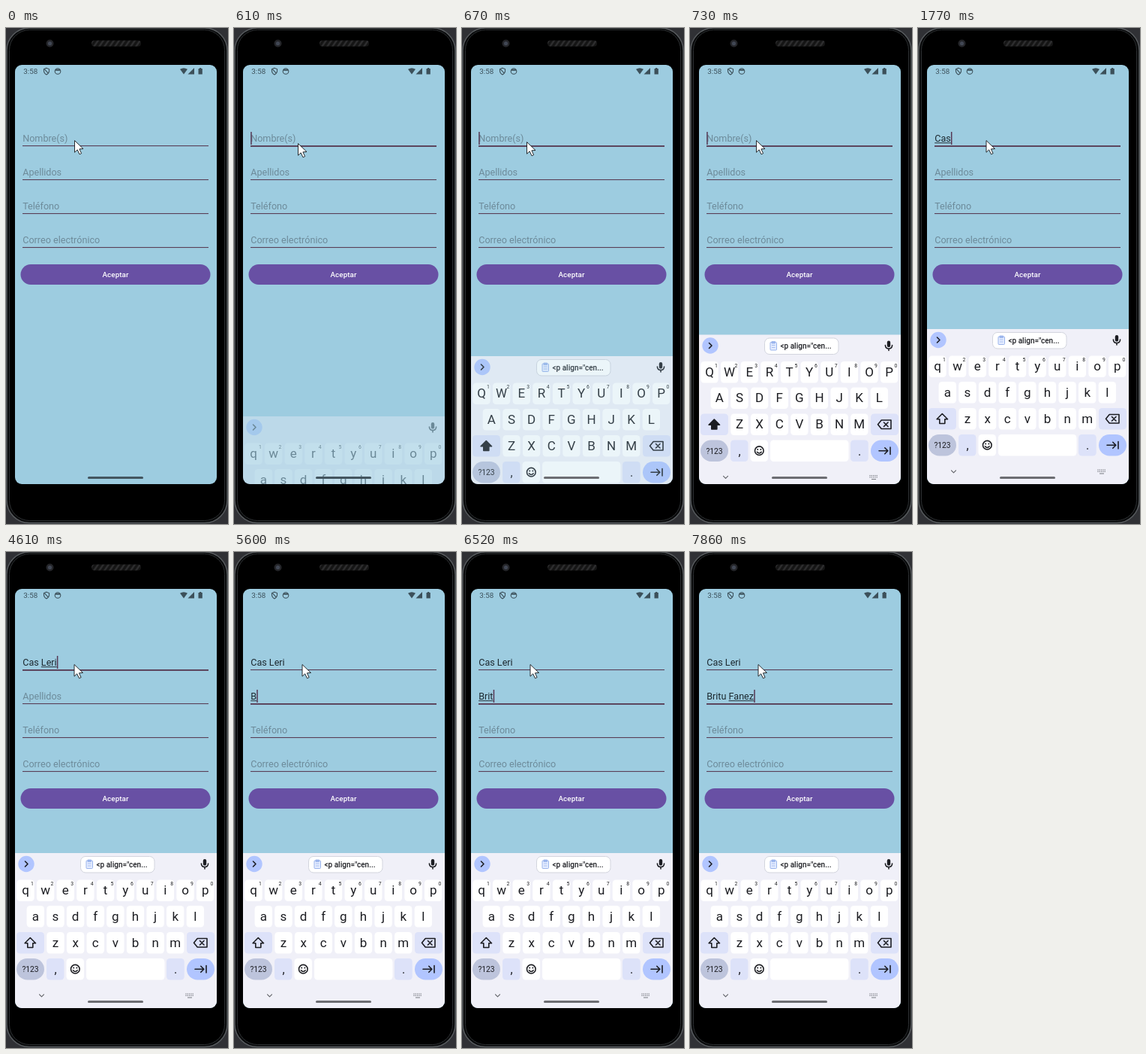
These frames come from a looping animation (296x659 px, 8000 ms). An HTML page:

```html
<!DOCTYPE html>
<html lang="es">
<head>
<meta charset="utf-8">
<style>
html, body { margin: 0; width: 100%; height: 100%; overflow: hidden; background: #303135; }
svg { display: block; width: 296px; height: 659px; font-family: Roboto, Arial, sans-serif; }
.entry { font-size: 12.6px; white-space: pre; }
.mid { text-anchor: middle; }
.ink { fill: none; stroke: #1c1d22; stroke-width: 1.6; stroke-linecap: round; stroke-linejoin: round; }
</style>
</head>
<body>
<svg viewBox="0 0 296 659">
  <defs>
    <clipPath id="screen"><rect x="12" y="49" width="269" height="557" rx="9"/></clipPath>
    <pattern id="mesh" width="7" height="8" patternUnits="userSpaceOnUse" patternTransform="skewX(-35)">
      <rect width="7" height="8" fill="#151515"/><rect width="3" height="8" fill="#2d2d2e"/>
    </pattern>
  </defs>
  <rect width="296" height="659" fill="#303135"/>
  <rect x="1" y="0" width="294" height="657.5" rx="30" fill="#0a0b0c" stroke="#5a5e61" stroke-width="1.4"/>
  <rect x="4.5" y="2.5" width="287" height="652" rx="27" fill="#000" stroke="#2b2e30"/>
  <circle cx="58.5" cy="20.5" r="5" fill="#25262a"/>
  <circle cx="58.5" cy="20.5" r="2.6" fill="#414754"/>
  <rect x="114" y="16.5" width="66" height="8" rx="4" fill="url(#mesh)"/>

  <g clip-path="url(#screen)">
    <rect x="12" y="49" width="269" height="557" fill="#9dcce0"/>
    <g fill="#3c505a">
      <text x="23.3" y="61" font-size="9.8">3:58</text>
      <path d="M232 54.8Q237 51.5 242 54.8L237 61.5Z"/>
      <path d="M251 53V61.5H242.5Z"/>
      <path d="M256.5 54H258V53H260.3V54H261.8V61.5H256.5Z"/>
      <g fill="none" stroke="#3c505a" stroke-width="1.1">
        <path d="M54 53.2L57.5 54.6V57.5Q57.2 60.4 54 62Q50.8 60.4 50.5 57.5V54.6ZM51.5 54.8L56.5 60.3"/>
        <circle cx="69" cy="57.5" r="3.8"/><path d="M66 55.8H72" stroke-width="2"/>
      </g>
    </g>
    <g id="form"></g>
    <rect x="19.5" y="314" width="253" height="27" rx="13.5" fill="#6850a4"/>
    <text class="mid" x="146" y="331.3" font-size="9.8" font-weight="500" letter-spacing=".1" fill="#fff">Aceptar</text>
    <rect id="caret" width="1.5" height="17" fill="#553753"/>
    <rect id="compose" height="1" fill="#24313a"/>
    <g id="keyboard"></g>
    <rect id="pill" x="109" y="596" width="74" height="3" rx="1.5"/>
  </g>
  <path id="pointer" d="M.5.5V16.2L4.2 12.8L7 18.8L9.6 17.6L6.9 11.8L12 11.5Z" fill="#fff" stroke="#15181b" stroke-width=".9" stroke-linejoin="round"/>
</svg>
<script>
const LOOP = 8000, LEFT = 22.2, STEP = 26.63;
const $ = id => document.getElementById(id);
const rowY = i => 151 + 45 * i;
const pen = document.createElement('canvas').getContext('2d');
const width = s => { pen.font = '12.6px Roboto, Arial, sans-serif'; return pen.measureText(s).width; };

// Latest entry whose time has come
const at = (list, t) => list.reduce((hit, e) => e[0] <= t ? e : hit, list[0]);

// time, field, text, start and end of the composing underline
const typing = [
  [0, -1, '', 0],
  [490, 0, '', 0],
  [850, 0, 'C', 0], [910, 0, 'Ca', 0, 1], [1090, 0, 'Ca', 0],
  [1770, 0, 'Cas', 0], [1890, 0, 'Cas ', 0, 3],
  [2070, 0, 'Cas L', 4], [2190, 0, 'Cas Le', 4], [2350, 0, 'Cas Ler', 4],
  [2470, 0, 'Cas Leri', 4], [2710, 0, 'Cas Leri ', 4, 8],
  [2890, 0, 'Cas Leri ', 9], [3010, 0, 'Cas Leri B', 9],
  [3290, 0, 'Cas Leri Br', 9], [3410, 0, 'Cas Leri Bri', 9],
  [3470, 0, 'Cas Leri Brit', 9], [3650, 0, 'Cas Leri Britu', 9],
  [3860, 0, 'Cas Leri Brit', 9], [4070, 0, 'Cas Leri Bri', 9],
  [4180, 0, 'Cas Leri Br', 9], [4290, 0, 'Cas Leri B', 9],
  [4400, 0, 'Cas Leri ', 9], [4510, 0, 'Cas Leri', 8], [4610, 0, 'Cas Leri', 4],
  [4980, 1, '', 0],
  [5600, 1, 'B', 0], [5890, 1, 'Br', 0], [6240, 1, 'Bri', 0], [6520, 1, 'Brit', 0],
  [6690, 1, 'Britu', 0], [6790, 1, 'Britu ', 0, 5], [7030, 1, 'Britu ', 6],
  [7240, 1, 'Britu F', 6], [7360, 1, 'Britu Fa', 6], [7480, 1, 'Britu Fan', 6],
  [7660, 1, 'Britu Fane', 6], [7860, 1, 'Britu Fanez', 6]
];
// time, x, y
const pointer = [[0, 91, 149], [60, 90, 151], [120, 88, 153], [430, 86, 153],
  [550, 85, 153], [670, 86, 151], [730, 88, 149], [790, 90.5, 149]];
// time, vertical offset, opacity
const slide = [[0, 206, 0], [550, 180, .08], [610, 116, .38], [670, 36, .8],
  [730, 7.5, 1], [790, 1.5, 1], [850, 0, 1]];

const hints = ['Nombre(s)', 'Apellidos', 'Teléfono', 'Correo electrónico'];
$('form').innerHTML = hints.map((h, i) =>
  `<text class="entry" x="${LEFT}" y="${rowY(i)}"></text>
   <rect x="22" width="248" y="${rowY(i) + 5}" fill="#593f57"/>`).join('');
const entries = [...document.querySelectorAll('.entry')];
const rules = [...document.querySelectorAll('#form rect')];

const box = (x, y, w, fill = '#fff', r = 4.5) =>
  `<rect x="${x}" y="${y}" width="${w}" height="28.5" rx="${r}" fill="${fill}"/>`;
const label = (x, y, s, size, cls = '') =>
  `<text class="mid ${cls}" x="${x}" y="${y}" font-size="${size}">${s}</text>`;
const ink = (d, extra = '') => `<path class="ink" d="${d}" ${extra}/>`;

function keyRow(chars, x0, y) {
  return [...chars].map((c, i) => {
    const x = x0 + i * STEP;
    return box(x - 11.7, y, 23.4) + label(x, y + 19.5, c, 17, 'letter');
  }).join('');
}

function buildKeyboard() {
  const soft = '#dde2f9', blue = '#b1c5ff';
  const digits = [...'1234567890'].map((d, i) => label(34.8 + i * STEP, 443.3, d, 6.8)).join('');
  const dots = [0, 1, 2, 3, 4].map(i =>
    `<path d="M${240 + i * 2.3} 586.5v4.2" stroke="#777a80" stroke-width="1.2" stroke-dasharray="1.2 1"/>`).join('');
  $('keyboard').innerHTML = `
    <rect x="12" y="400" width="269" height="220" fill="#f0f0f8"/>
    <g fill="#1c1d22">
      <circle cx="27" cy="414.5" r="10.7" fill="${blue}"/>${ink('M25.5 411L29 414.5L25.5 418')}
      <g id="chip">
        <rect x="99.5" y="404.5" width="98.5" height="21.5" rx="6.5" fill="#fff" stroke="#d3d5de"/>
        <rect x="107" y="410" width="8.5" height="10.5" rx="1" fill="#e4ecff" stroke="#9ab4ec"/>
        <path d="M109 409h4.5v2.5h-4.5zM109 414h4.5M109 417h4.5" fill="#9ab4ec" stroke="#9ab4ec" stroke-width=".8"/>
        <text x="120.5" y="418.8" font-size="10" font-weight="500">&lt;p align="cen...</text>
      </g>
      <rect x="262.8" y="408" width="4.4" height="8.6" rx="2.2"/>
      ${ink('M260.4 414Q260.6 418.5 265 418.5Q269.4 418.5 269.6 414M265 418.5V421', 'stroke-width="1.3"')}
      ${keyRow('qwertyuiop', 26, 435.5)}${digits}
      ${keyRow('asdfghjkl', 39.3, 470)}
      ${box(14, 505, 37, soft)}${keyRow('zxcvbnm', 66, 505)}${box(241, 505, 37, soft)}
      <path id="shift" class="ink" d="M32.3 512.5L39.5 519.7H35.8V525.5H28.8V519.7H25.1Z"/>
      ${ink('M255.2 513.5H268V525H255.2L250.5 519.2ZM258.5 516.5L264 522M264 516.5L258.5 522')}
      ${box(14, 540, 37, '#bdc4dc', 14.2)}${label(32.5, 558, '?123', 10.3)}
      ${box(54, 540, 23.5, soft)}${label(66, 560, ',', 16)}
      ${box(80.5, 540, 23.5)}
      <circle class="ink" cx="92.3" cy="554.2" r="5.8"/>
      <circle cx="90.2" cy="552.5" r="1"/><circle cx="94.4" cy="552.5" r="1"/>
      ${ink('M89.4 555.8Q92.3 559.2 95.2 555.8')}
      ${box(107, 540, 104.5)}
      ${box(214, 540, 23.8, soft)}${label(226, 560, '.', 16)}
      ${box(241, 540, 37, blue, 14.2)}
      ${ink('M252 554.3H263.5M259.8 550.3L263.8 554.3L259.8 558.3M267 549.5V559')}
      ${ink('M44.5 587.8L47.5 590.8L50.5 587.8', 'style="stroke:#65676d;stroke-width:1.2"')}
      ${dots}<path d="M242 592h6" stroke="#777a80"/>
    </g>`;
}
buildKeyboard();
const letters = [...document.querySelectorAll('.letter')].map(el => [el, el.textContent]);

function setAttrs(el, attrs) {
  for (const k in attrs) el.setAttribute(k, attrs[k]);
}

function draw(t) {
  const [since, field, text, from, to = text.length] = at(typing, t);
  const values = [field === 1 ? 'Cas Leri' : field === 0 ? text : '', field === 1 ? text : '', '', ''];
  entries.forEach((el, i) => {
    el.textContent = values[i] || hints[i];
    el.setAttribute('fill', values[i] ? '#1c2930' : '#6d8b9a');
    rules[i].setAttribute('height', i === field ? 1.9 : 1.1);
  });

  const blinkOn = field >= 0 && (t - since) % 1000 < 500;
  setAttrs($('caret'), {
    x: LEFT + width(text) + (text ? .2 : 0), y: rowY(Math.max(field, 0)) - 13,
    visibility: blinkOn ? 'visible' : 'hidden'
  });
  const start = width(text.slice(0, from));
  setAttrs($('compose'), {
    x: LEFT + start, y: rowY(Math.max(field, 0)) + 1.2,
    width: Math.max(0, width(text.slice(0, to)) - start)
  });

  const [, dy, alpha] = at(slide, t);
  setAttrs($('keyboard'), { transform: `translate(0 ${dy})`, opacity: alpha });
  const caps = t >= 670 && t < 850;
  letters.forEach(([el, c]) => { el.textContent = caps ? c.toUpperCase() : c; });
  $('shift').style.fill = caps ? '#1c1d22' : 'none';
  $('chip').setAttribute('visibility', t < 670 ? 'hidden' : 'visible');
  $('pill').setAttribute('fill', t < 670 ? '#43555f' : '#6c6d72');

  const [, px, py] = at(pointer, t);
  $('pointer').setAttribute('transform', `translate(${px} ${py})`);
}

function tick() {
  draw(performance.now() % LOOP);
  requestAnimationFrame(tick);
}
tick();
</script>
</body>
</html>
```
